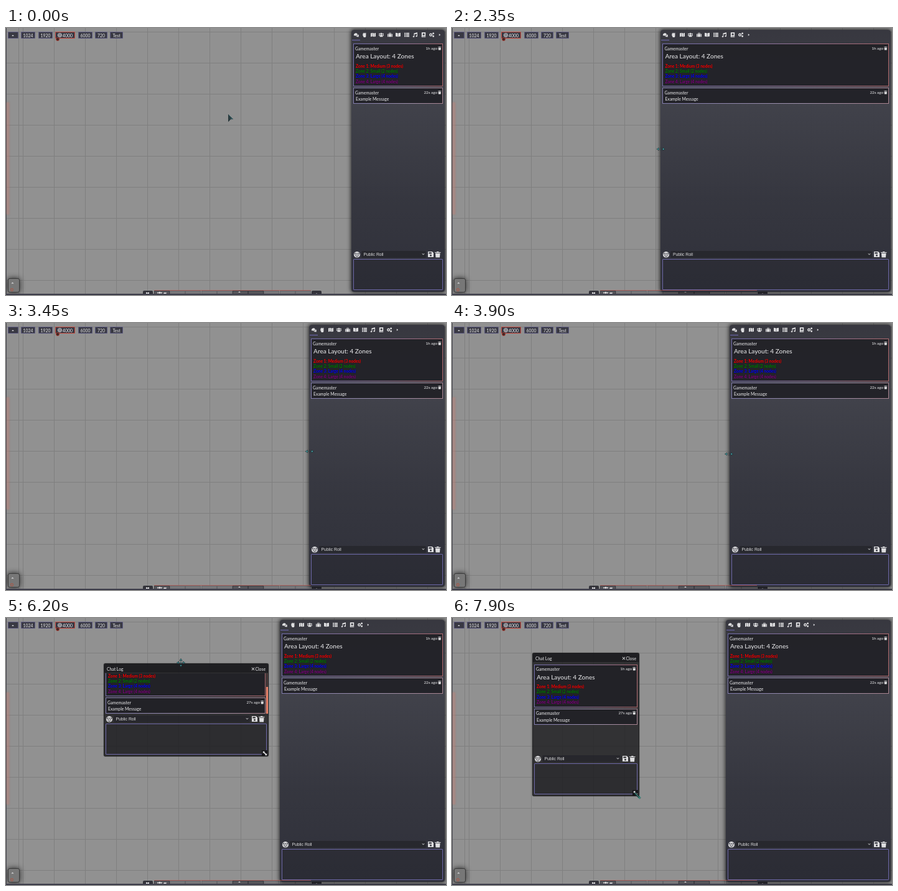
These frames come from a looping animation (707x430 px, 8000 ms). An HTML page:

```html
<!DOCTYPE html>
<html lang="en">
<head>
<meta charset="utf-8">
<title>Resizable chat sidebar</title>
<style>
html, body { margin: 0; width: 100%; height: 100%; overflow: hidden; }
body { position: relative; font: 500 6.8px/12px Lato, sans-serif; color: #dedee0; }
body * { position: absolute; box-sizing: border-box; white-space: nowrap; }
#stage { left: 0; top: 0; width: 707px; height: 430px; overflow: hidden; background:
  repeating-linear-gradient(90deg, #7f7f7f 0 1px, transparent 1px 50px) 27px 0,
  repeating-linear-gradient(#7f7f7f 0 1px, transparent 1px 50px) 0 6px, #919191; }
svg { overflow: visible; fill: currentColor; fill-rule: evenodd; }
#edge { left: 0; top: 0; width: 1px; height: 430px; background: #45454d; }
#floor { left: 0; top: 428px; width: 707px; height: 2px; background: #3c3c49; }
#glow { left: 1px; top: 120px; width: 4px; height: 180px; background: #b9817880; box-shadow: 0 0 3px #c8705e80; }
.tab { top: 6px; height: 11px; line-height: 10px; text-align: center; background: #393943;
  border: 1px solid #5c5a80; border-radius: 1px; }
.tab.on { border-color: #c5493f; padding-left: 8px; }
#badge { left: 80px; top: 15px; width: 6px; height: 6px; border: 1px solid #a83a30; border-radius: 50%; background: #3a2625; }
#players { left: 3px; top: 403px; width: 19px; height: 23px; border: 1px solid #3a3a3a; border-radius: 3px;
  background: #777; box-shadow: 0 0 8px #222; }
#players i { left: 3px; top: 15px; width: 5px; height: 5px; border: 1px solid #b5523f; border-radius: 50%; }
.slot { top: 423px; height: 6px; border: 1px solid #66666a; background: #77777a; }
.hotbtn { top: 423px; width: 16px; height: 6px; background: #33333a; border-radius: 2px 2px 0 0; }
#hotline { left: 238px; top: 422px; width: 252px; height: 1px; background: #b9524ab0; }
.panel { border-radius: 4px; }
#side { top: 3px; right: 2px; height: 422px; --top: 19px; box-shadow: 0 0 6px 1px #000b;
  background: linear-gradient(#35353df8, #3e3f48f6 28%, #33343df8 65%, #2d2e38f8); }
#side .line { left: 1px; top: 16px; width: 13px; height: 1px; background: #6f68b4; }
#win { --top: 15.5px; border-radius: 3px; background: #1b1b1dcc; box-shadow: 0 0 0 1px #15151799 inset, 0 0 2px #0006; }
#win .head { left: 1px; right: 1px; top: 1px; height: 14px; background: #1b1b1fcc; border-radius: 3px 3px 0 0; }
.log { left: 3px; right: 3px; top: var(--top); bottom: 68.5px; overflow: hidden; }
.list { left: 0; right: 0; top: 3px; height: 97px; }
.msg { left: 0; right: 0; background: #222227ee; border: 1px solid;
  border-image: linear-gradient(100deg, #746fae, #94759a 55%, #b0686a) 1; }
.msg.calm { border-image: linear-gradient(100deg, #827dae, #a093ae 60%, #a98490) 1; }
.zone { font-weight: bold; font-size: 6.6px; text-shadow: 0 0 1px #0008; }
.select { left: 16px; right: 30px; bottom: 55px; height: 11px; background: #24242ac0; border-radius: 2px; }
.entry { left: 3px; right: 3px; bottom: 3px; height: 50px; background: #1e1e2640; border: 1px solid #6c67a6; border-radius: 1px; }
#thumb { right: 1px; width: 3px; background: #ee866e; }
#track { right: 2px; width: 1px; top: 16px; bottom: 68px; background: #6d4743; }
#grip { right: 2px; bottom: 1px; width: 9px; height: 9px; background: #17171a; }
#cursor { left: 0; top: 0; width: 1px; height: 1px; stroke: #10282c; stroke-width: .7; }
</style>
</head>
<body>
<div id="stage"></div>
<script>
const circle = (x, y, r) => `M${x} ${y - r}a${r} ${r} 0 1 1-.05 0Z`;
const ICONS = {
  chat: 'M0 6.5C-1 1 7 0 7 4S3 7 2 6.6ZM8 4C8 7 5 8 4 7.8 6 9.5 8 9 10 9.2 9 8 11 5 8 4Z',
  fist: 'M2 2h1.5v-1H5v1h1.5v-1H8v7l-1 2H3.5l-2-4Z',
  map: 'M0 2l3-1v7l-3 1ZM3.6 1l3 1v7l-3-1ZM7.2 2L10 1v7l-2.8 1Z',
  users: circle(5, 3, 2) + 'M2 9V7q0-2 3-2t3 2v2Z' + circle(1.4, 3.2, 1.2) + circle(8.6, 3.2, 1.2) + 'M0 7V5h2v2ZM8.2 5H10v2H8.2Z',
  bag: 'M3 3V1h4v2h.5v6h-5V3ZM4 3h2V2H4ZM0 3h1.8v6H0ZM8.2 3H10v6H8.2Z',
  book: 'M0 1q3 0 4.6 1v7Q3 8 0 8ZM10 1q-3 0-4.6 1v7Q7 8 10 8Z',
  list: [1, 4, 7].map(y => `M0 ${y}h2.5v2H0ZM3.3 ${y}H10v2H3.3Z`).join(''),
  music: 'M3 2l7-2v7.5a1.7 1.4 0 1 1-1.2-1.3V3L4.2 4.2v4.3A1.7 1.4 0 1 1 3 7.2Z',
  atlas: 'M1 1q0-1 1-1h7v8H2.5v1H9v1H2q-1 0-1-1Z' + circle(5.2, 4, 2),
  cogs: circle(3.3, 5, 3.2) + circle(3.3, 5, 1.2) + circle(8.3, 2.2, 1.8) + circle(8.3, 7.8, 1.8),
  right: 'M3 2l4 3-4 3Z',
  up: 'M2 6.5l3-3 3 3Z',
  die: circle(5, 5, 5) + 'M5 2L2 7h6ZM5 3.3L7 6.4H3ZM1 3l2.6-1.3L1.4 5.6ZM9 3L6.4 1.7l2.2 3.9ZM2.2 8h5.6L5 9.2Z',
  save: 'M0 0h7.5L10 2.5V10H0ZM1.5 1.5v2.3h5V1.5Z' + circle(5, 7, 1.6),
  trash: 'M0 1h3l.5-1h3l.5 1h3v1H0ZM1 3h8l-.6 7H1.6Z',
  down: 'M1 3l4 4 4-4-1-1-3 3-3-3Z',
  close: 'M1 2l1-1 3 3 3-3 1 1-3 3 3 3-1 1-3-3-3 3-1-1 3-3Z',
  resize: 'M1 1h4L3.8 2.2l4 4L9 5v4H5l1.2-1.2-4-4L1 5Z',
  target: circle(5, 5, 5) + circle(5, 5, 3.8) + circle(5, 5, 2.7) + circle(5, 5, 1.3)
};
const CURSORS = {
  arrow: '<path d="M.5-.5L7.5 6.5 3.5 7 .5 10.5Z" fill="#2a3d41" stroke="#152327"/><path d="M1 0L7 6.3 4 6.6" fill="none" stroke="#4d8288"/>',
  ew: '<path d="M-6.5 0l3.5-2v4ZM6.5 0L3-2v4Z" fill="#55b5b8"/><path d="M0-3V3" stroke="#22363a"/>',
  move: '<path d="M0-6.5l2 3h-4ZM0 6.5l2-3h-4ZM-6.5 0l3-2v4ZM6.5 0l-3-2v4Z" fill="#4fa5a9"/><path d="M-3 0H3M0-3V3" stroke="#22464b"/>',
  nwse: '<path d="M-4.5-4.5l9 9" stroke="#16302f" stroke-width="3"/><path d="M-4-4l8 8M1 4.2h3.2V1" fill="none" stroke="#4fa898" stroke-width="1"/>'
};

// Icons are centred on (x, y); `side` and `edge` choose the anchoring edges.
const icon = (name, x, y, size, side = 'left', edge = 'top') =>
  `<svg viewBox="0 0 10 10" style="${side}:${x - size / 2}px;${edge}:${y - size / 2}px;width:${size}px;height:${size}px"><path d="${ICONS[name]}"/></svg>`;
const text = (label, x, y, style = '', side = 'left', cls = '') =>
  `<span class="${cls}" style="${side}:${x}px;top:${y - 6}px;${style}">${label}</span>`;
const message = (cls, top, height, ago, body) =>
  `<div class="msg ${cls}" style="top:${top}px;height:${height}px">${text('Gamemaster', 2, 6.5)}` +
  text(ago, 8, 6.5, 'font-size:6.3px', 'right') + icon('trash', 4, 6.5, 5.5, 'right') + body + '</div>';

const zones = [['Medium (3', 'red'], ['Small (2', 'green'], ['Large (4', 'blue'], ['Large (4', 'purple']];
const chat = ago => `<div class="log"><div class="list">` +
  message('', 0, 69, '1h ago', text('Area Layout: 4 Zones', 3, 19, 'font-size:10.05px') +
    zones.map(([size, color], i) => text(`Zone ${i + 1}: ${size} nodes)`, 3, 34.5 + i * 8.4, `color:${color}`, 'left', 'zone')).join('')) +
  message('calm', 71, 26, ago, text('Example Message', 3, 17)) + `</div></div>
  <div class="select">${text('Public Roll', 3.5, 5.5, "font-family:'Liberation Sans',sans-serif")}${icon('down', 5, 5.5, 5, 'right')}</div>` +
  icon('die', 8.5, 60.5, 10, 'left', 'bottom') + icon('save', 22.5, 60.5, 9, 'right', 'bottom') +
  icon('trash', 11, 60.5, 9.5, 'right', 'bottom') + '<div class="entry"></div>';

const tab = (label, x, w, cls = '') => `<div class="tab ${cls}" style="left:${x}px;width:${w}px">${label}</div>`;
const slots = Array.from({ length: 10 }, (_, i) =>
  `<div class="slot" style="left:${238 + i * 25.2}px;width:25px${[0, 5, 6].includes(i) ? ';background:#56565b;border-color:#3c3c42' : ''}"></div>`).join('');
const tools = ['chat', 'fist', 'map', 'users', 'bag', 'book', 'list', 'music', 'atlas', 'cogs'];

const $ = id => document.getElementById(id);
$('stage').innerHTML = `<div id="edge"></div><div id="glow"></div>
  ${tab(icon('up', 7, 4.5, 6), 3, 17)}${tab('1024', 24, 23)}${tab('1920', 52, 23)}
  ${tab(icon('target', 6.5, 4.5, 7) + '4000', 79, 32, 'on')}${tab('6000', 116, 23)}${tab('720', 143, 20)}${tab('Test', 167, 21)}
  <div id="badge"></div>
  <div id="players">${icon('up', 6, 6, 7)}<i></i></div>
  <div class="hotbtn" style="left:220px">${icon('book', 7.5, 4.5, 5)}</div>${slots}
  ${icon('users', 247, 428, 8)}${icon('fist', 255, 428, 7)}${icon('up', 375, 425, 6)}
  <div class="hotbtn" style="left:491px">${icon('up', 7.5, 4.5, 6)}</div><div id="floor"></div>
  <div id="side" class="panel">${tools.map((name, i) => icon(name, 7.5 + i * 13.5, 7.5, 8)).join('')}
    ${icon('right', 142, 7.5, 6)}<div class="line"></div>${chat('22s ago')}</div>
  <div id="hotline"></div>
  <div id="win" class="panel"><div class="head">${text('Chat Log', 4, 7.5)}${text('Close', 4, 7.5, '', 'right')}${icon('close', 24, 7.5, 6, 'right')}</div>
    ${chat('27s ago')}<div id="track"></div><div id="thumb"></div>
    <div id="grip">${icon('resize', 4.5, 4.5, 8)}</div></div>
  <svg id="cursor"></svg>`;

// Keys are [time, value...]; the curve between them never overshoots.
function follow(keys, t, column = 1) {
  const last = keys.length - 1;
  if (t <= keys[0][0]) return keys[0][column];
  if (t >= keys[last][0]) return keys[last][column];
  const i = keys.findIndex(k => k[0] > t) - 1;
  const slope = j => j < 0 || j >= last ? 0 : (keys[j + 1][column] - keys[j][column]) / (keys[j + 1][0] - keys[j][0]);
  const tangent = j => {
    const a = slope(j - 1), b = slope(j);
    return a * b > 0 ? 2 * a * b / (a + b) : 0;
  };
  const span = keys[i + 1][0] - keys[i][0], u = (t - keys[i][0]) / span, v = 1 - u;
  return keys[i][column] * v * v * (1 + 2 * u) + keys[i + 1][column] * u * u * (3 - 2 * u) +
    span * u * v * (tangent(i) * v - tangent(i + 1) * u);
}

const pointer = [[0, 357, 140], [750, 552, 182], [950, 552, 182], [1050, 555, 187], [1300, 555, 187], [1600, 510, 189],
  [2100, 333, 195], [2300, 333, 195], [2950, 496, 202], [3150, 505, 204], [3900, 445, 211], [4000, 441, 212],
  [4700, 445, 7], [4850, 445, 7], [5100, 424, 92], [5450, 412, 148], [5700, 412, 148], [6200, 281, 72],
  [6320, 262, 64], [6550, 369, 237], [6800, 393, 222], [7100, 391, 206], [7250, 391, 206], [7900, 298, 286]];
const sideLeft = [[1300, 555], [1600, 512], [2100, 333], [2300, 333], [2950, 492], [3150, 502], [3900, 446], [4000, 440]];
const winPos = [[5700, 279, 140], [6200, 157, 73], [6350, 129, 56]];
const winSize = [[7250, 265, 150], [7900, 172, 231]];
const modes = [[0, 'arrow'], [950, 'ew'], [4150, 'arrow'], [5400, 'move'], [6400, 'arrow'], [7000, 'nwse']];
const CONTENT = 100.5;
let shownMode;

function render(t) {
  $('side').style.left = follow(sideLeft, t) + 'px';

  const h = follow(winSize, t, 2), view = h - 84, hidden = Math.max(0, CONTENT - view);
  const scroll = t < 4900 ? 0 : hidden;
  Object.assign($('win').style, {
    display: t < 4750 ? 'none' : 'block',
    left: follow(winPos, t) + 'px', top: follow(winPos, t, 2) + 'px',
    width: follow(winSize, t) + 'px', height: h + 'px'
  });
  const list = $('win').querySelector('.list');
  list.style.top = 3 - scroll + 'px';
  list.style.right = hidden ? '2px' : 0;
  $('track').style.display = $('thumb').style.display = hidden ? 'block' : 'none';
  $('thumb').style.top = 15.5 + scroll * view / CONTENT + 'px';
  $('thumb').style.height = view * view / CONTENT + 'px';

  const mode = modes.filter(m => m[0] <= t).pop()[1];
  if (mode !== shownMode) $('cursor').innerHTML = CURSORS[shownMode = mode];
  $('cursor').style.transform = `translate(${follow(pointer, t)}px, ${follow(pointer, t, 2)}px)`;
}

const start = performance.now();
function tick() {
  const t = (performance.now() - start) % 8000;
  render(Math.floor(t / 50) * 50);
  requestAnimationFrame(tick);
}
tick();
</script>
</body>
</html>
```
